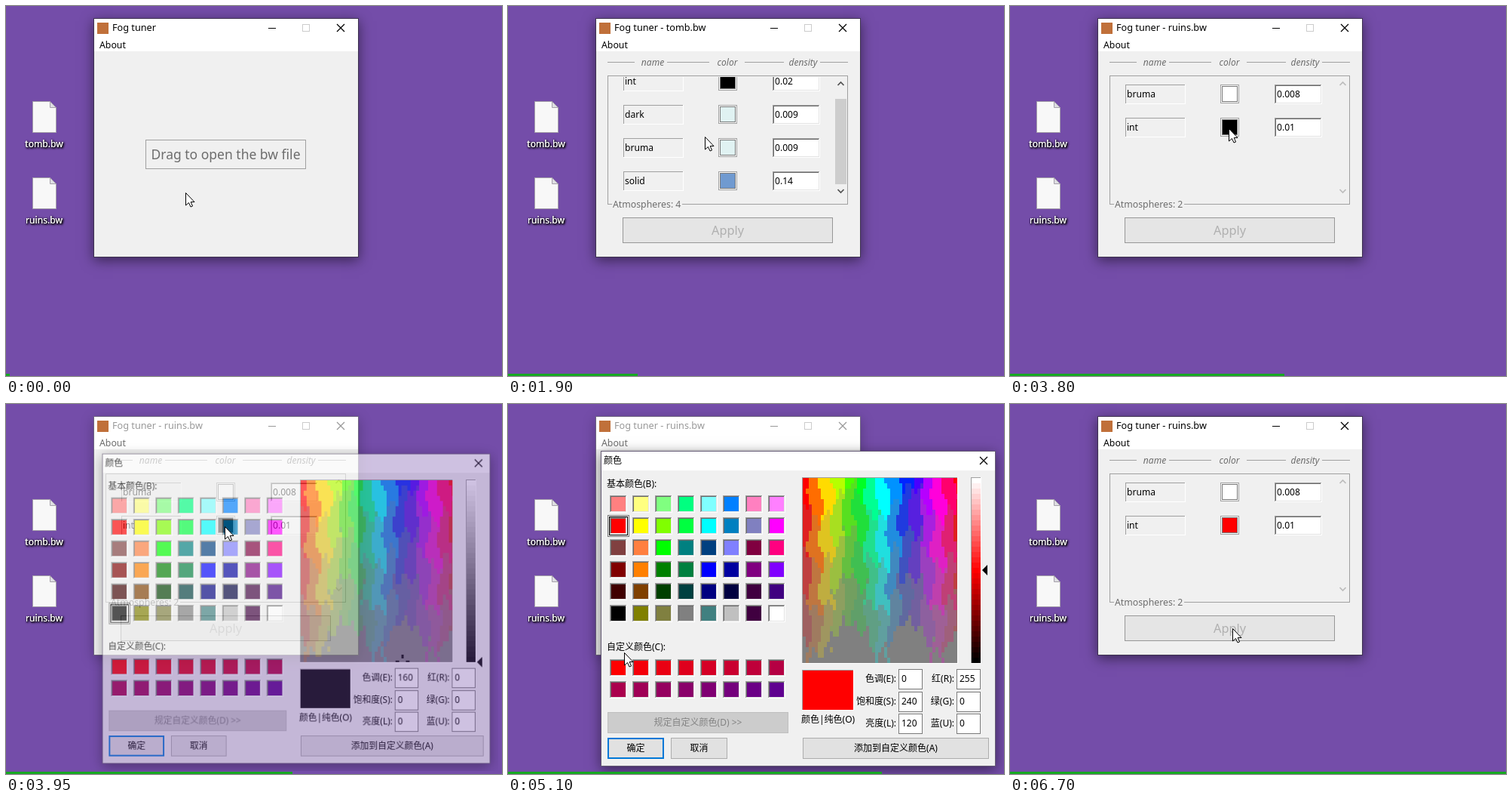
An HTML page with a canvas that plays this animation: 658x490 px, repeating every 7.1 s.

```html
<!DOCTYPE html>
<html lang="en">
<head>
<meta charset="utf-8">
<title>Fog tuner</title>
<style>
html, body { margin: 0; width: 100%; height: 100%; overflow: hidden; background: #744da9; }
canvas { display: block; }
</style>
</head>
<body>
<canvas id="stage" width="658" height="490"></canvas>
<script>
const W = 658, H = 490, LOOP = 7100, STEP = 50;
const APP = 'Fog tuner';
const FONT = '"Noto Sans", "Noto Sans CJK SC", sans-serif';
const screen = document.getElementById('stage').getContext('2d');
let g = screen;

const layer = () => {
  const c = document.createElement('canvas');
  c.width = W;
  c.height = H;
  return c.getContext('2d');
};
const clamp = v => Math.max(0, Math.min(1, v));
const within = (t, a, b) => t >= a && t < b;

function rect(x, y, w, h, fill) {
  g.fillStyle = fill;
  g.fillRect(x, y, w, h);
}

function box(x, y, w, h, fill, edge, line = 1) {
  rect(x, y, w, h, edge);
  rect(x + line, y + line, w - 2 * line, h - 2 * line, fill);
}

function sunken(x, y, w, h, fill, dark = '#a0a0a0') {
  rect(x, y, w, h, '#fff');
  rect(x, y, w - 1, h - 1, dark);
  rect(x + 1, y + 1, w - 2, h - 2, fill);
}

function deep(x, y, w, h, fill) {
  sunken(x, y, w, h, '#e3e3e3');
  rect(x + 1, y + 1, w - 3, h - 3, '#696969');
  rect(x + 2, y + 2, w - 4, h - 4, fill);
}

function text(s, x, y, size = 12, color = '#000', align = 'left', style = '') {
  g.font = `${style} ${size}px ${FONT}`;
  g.textAlign = align;
  g.fillStyle = color;
  g.fillText(s, x, y);
}

function stroke(points, color, width = 1) {
  g.strokeStyle = color;
  g.lineWidth = width;
  g.beginPath();
  points.forEach(([x, y]) => g.lineTo(x, y));
  g.stroke();
}

function poly(points, fill, edge) {
  g.beginPath();
  points.forEach(([x, y]) => g.lineTo(x, y));
  g.closePath();
  g.fillStyle = fill;
  g.fill();
  if (edge) {
    g.strokeStyle = edge;
    g.lineWidth = 1;
    g.stroke();
  }
}

function dotted(x, y, w, h) {
  g.strokeStyle = '#000';
  g.lineWidth = 1;
  g.setLineDash([1, 1]);
  g.strokeRect(x + .5, y + .5, w - 1, h - 1);
  g.setLineDash([]);
}

function cross(x, y, color) {
  stroke([[x, y], [x + 10, y + 10]], color, 1.2);
  stroke([[x + 10, y], [x, y + 10]], color, 1.2);
}

function shadow(x, y, w, h, alpha) {
  g.save();
  g.shadowColor = `rgba(0,0,0,${alpha})`;
  g.shadowBlur = 16;
  g.shadowOffsetY = 4;
  rect(x, y, w, h, '#444');
  g.restore();
}

// Pointer: resting points, eased in between
const path = [
  [300, 238, 247], [600, 50, 147], [680, 50, 147], [950, 250, 196], [1050, 250, 196],
  [1250, 261, 173], [1900, 261, 173], [2450, 50, 248], [2600, 50, 248], [2900, 251, 197],
  [3100, 251, 197], [3600, 290, 162], [4200, 290, 162], [4600, 146, 161], [4800, 146, 161],
  [5350, 160, 456], [5600, 160, 456], [6200, 295, 297], [7100, 295, 297]
];
const presses = [[650, 1000], [2550, 3000], [3700, 3800], [4650, 4800], [5400, 5500], [6350, 6450]];

function pointer(t) {
  const i = path.findIndex(p => p[0] > t);
  if (i < 1) return path[0].slice(1);
  const [t0, x0, y0] = path[i - 1], [t1, x1, y1] = path[i];
  const u = (t - t0) / (t1 - t0), e = u * u * (3 - 2 * u);
  return [x0 + (x1 - x0) * e, y0 + (y1 - y0) * e].map(Math.round);
}

function drawPointer(t, [x, y], held) {
  if (held) {
    g.fillStyle = 'rgba(246,243,84,.8)';
    g.beginPath();
    g.arc(x, y, 12, 0, 7);
    g.fill();
  }
  const arrow = [[0, 0], [0, 16.5], [4, 13], [6.5, 18.5], [9, 17.5], [6.7, 12], [11.5, 12]];
  poly(arrow.map(([a, b]) => [x + a + .5, y + b + .5]), '#fff', '#000');
  if (held && t < 3100 && x > 117) {
    dotted(x + 3, y + 15, 12, 8);
    box(x + 10, y + 20, 11, 11, '#fff', '#000');
    rect(x + 13, y + 25, 5, 1, '#000');
    rect(x + 15, y + 23, 1, 5, '#000');
  }
}

function file(name, y, [px, py], held) {
  if (within(px, 13, 89) && within(py, y - 5, y + 71)) {
    box(13, y - 5, 76, 76, '#8a69b6', '#a78dc9');
    if (held) rect(14, y - 4, 74, 74, 'rgba(255,255,255,.15)');
  }
  poly([[35.5, y + .5], [58.5, y + .5], [66.5, y + 8.5], [66.5, y + 41.5], [35.5, y + 41.5]], '#f8f8f8', '#a5a0aa');
  poly([[58.5, y + .5], [58.5, y + 8.5], [66.5, y + 8.5]], '#dedee2', '#a5a0aa');
  g.save();
  g.shadowColor = '#000';
  g.shadowBlur = 3;
  g.shadowOffsetX = g.shadowOffsetY = 1;
  for (let i = 0; i < 3; i++) text(name, 50.5, y + 61, 12.1, '#fff', 'center');
  g.restore();
}

// Main window
const tomb = [['int', '#000', '0.02'], ['dark', '#e0f2f2', '0.009'], ['bruma', '#e0f2f2', '0.009'], ['solid', '#709ad0', '0.14']];
const ruins = red => [['bruma', '#fff', '0.008'], ['int', red ? '#f00' : '#000', '0.01']];

function row([name, color, density], y) {
  sunken(153, y, 80, 26, '#f0f0f0');
  text(name, 155, y + 17, 12.1);
  box(279, y, 25, 25, '#fff', '#a0a0a0');
  box(281, y + 2, 21, 21, color, '#777');
  deep(351, y, 63, 26, '#fff');
  text(density, 354, y + 17, 12.1);
}

function chevron(y, dir, color) {
  stroke([[437.5, y + 2 * dir], [441.5, y - 2 * dir], [445.5, y + 2 * dir]], color, 1.7);
}

function panel(rows, scroll, canApply) {
  const gray = '#6d6d6d', line = '#a0a0a0';
  [[132, 168], [211, 267], [314, 366], [414, 451]].forEach(([a, b]) => rect(a, 74, b - a, 1, line));
  text('name', 192, 79, 12, gray, 'center', 'italic');
  text('color', 291, 79, 12, gray, 'center', 'italic');
  text('density', 391.5, 79, 12, gray, 'center', 'italic');

  box(132, 92, 319, 171, '#f0f0f0', line);
  rect(138, 262, 93, 1, '#f0f0f0');
  text('Atmospheres: ' + rows.length, 139, 267, 12.3, gray);

  g.save();
  g.beginPath();
  g.rect(133, 94, 317, 159);
  g.clip();
  rows.forEach((r, i) => row(r, 104 + 44 * i - scroll));
  g.restore();

  const full = rows.length > 3, ink = full ? '#505050' : '#bcbcbc';
  if (full) rect(434, 111 + Math.round(scroll * 12 / 17), 15, 113, '#cdcdcd');
  chevron(103, 1, ink);
  chevron(245, -1, ink);

  box(152, 280, 279, 34, '#e5e5e5', '#979797');
  text('Apply', 291.5, 303, 16.3, canApply ? '#000' : '#b0b0b0', 'center');
}

function mainWindow(t) {
  const idle = within(t, 650, 950) || within(t, 2550, 2900) || within(t, 3850, 5550);
  const name = t < 1050 ? '' : t < 3050 ? ' - tomb.bw' : ' - ruins.bw';
  const ink = idle ? '#999' : '#000';
  shadow(116, 16, 352, 317, idle ? .25 : .5);
  box(116, 16, 352, 317, '#f0f0f0', idle ? '#6f6580' : '#3f3350');
  rect(117, 17, 350, 43, '#fff');
  rect(121, 22, 15, 15, '#c0703a');
  text(APP + name, 141, 33, 12.7, ink);
  rect(348, 29, 10, 1, ink);
  box(393, 24, 10, 10, '#fff', '#ccc');
  cross(439, 24, ink);
  text('About', 124, 56, 12.3, idle ? '#6d6d6d' : '#000');
  if (t < 1050) {
    box(185, 177, 213, 39, '#f0f0f0', '#a0a0a0');
    text('Drag to open the bw file', 291.5, 203, 17.5, '#6d6d6d', 'center');
  } else if (t < 3050) {
    panel(tomb, Math.round(17 * clamp((t - 1350) / 150)), false);
  } else {
    panel(ruins(t >= 5550), 0, within(t, 5550, 6450));
  }
}

// Colour dialog
const basic = ('f88 ff8 8f8 0f8 8ff 08f f8c f8f f00 ff0 8f0 0f4 0ff 08c 88c f0f ' +
  '844 f84 0f0 088 048 88f 804 f08 800 f80 080 084 00f 00a 808 80f ' +
  '400 840 040 044 008 004 404 408 000 880 884 888 488 ccc 404 fff').split(' ')
  .map(c => '#' + [...c].map(d => d === 'f' ? 'ff' : d + '0').join(''));
const custom = Array.from({ length: 16 }, (_, i) => `rgb(${255 - 10.6 * i},0,${9.6 * i})`);

// Hue across, saturation down, in a few flat tones with ragged borders
const spectrum = layer();
g = spectrum;
for (let i = 0; i < 52; i++) {
  for (let j = 0; j < 35; j++) {
    const hue = Math.round(i / 52 * 14 + .25 * Math.sin(j * .6 + i * .3)) * 360 / 14;
    const jag = .1 * Math.sin(hue * 2) + .04 * Math.sin(i * 1.4);
    const sat = clamp(Math.round((1 - j / 34 + jag) * 4) / 4);
    rect(i * 4, j * 7, 4, 7, `hsl(${hue},${sat * 100}%,50%)`);
  }
}

function swatches(colors, y, chosen) {
  colors.forEach((c, i) => {
    const x = 135 + i % 8 * 30, sy = y + 29 * (i >> 3);
    if (i === chosen) {
      dotted(x - 3, sy - 3, 29, 29);
      box(x - 1, sy - 1, 25, 25, c, '#000');
    }
    deep(x, sy, 23, 23, c);
  });
}

function button(label, x, y, w, fill, edge, line, color) {
  box(x, y, w, 28, fill, edge, line);
  text(label, x + w / 2, y + 18, 12, color, 'center');
}

function field(label, value, x, y) {
  text(label, x - 3, y + 17, 12, '#000', 'right');
  box(x, y, 32, 27, '#fff', '#7a7a7a');
  text(value, x + 4, y + 17);
}

function dialog(t, [px, py], held) {
  const red = t >= 4650, ink = t < 5550 ? '#000' : '#999';
  shadow(123, 62, 524, 418, .5);
  box(123, 62, 524, 418, '#f0f0f0', '#655b74');
  rect(124, 63, 522, 25, '#fff');
  text('颜色', 127, 79, 12, ink);
  cross(626, 70, ink);

  text('基本颜色(B):', 131, 110);
  swatches(basic, 121, red ? 8 : 40);
  text('自定义颜色(C):', 131, 326);
  swatches(custom, 338, -1);

  const hover = py > 442 && px < 207;
  button('规定自定义颜色(D) >>', 132, 408, 240, '#ccc', '#bfbfbf', 1, '#838383');
  button('确定', 132, 442, 75, hover ? held ? '#cce4f7' : '#e5f1fb' : '#e1e1e1', '#0078d7', hover ? 1 : 2);
  button('取消', 216, 442, 75, '#e1e1e1', '#adadad', 1);
  button('添加到自定义颜色(A)', 391, 442, 247, '#e1e1e1', '#adadad', 1);

  sunken(390, 97, 207, 247, '#808080');
  g.drawImage(spectrum.canvas, 0, 0, 205, 245, 391, 98, 205, 245);
  if (!red) {
    rect(527, 333, 3, 5, '#000');
    rect(519, 341, 5, 2, '#000');
    rect(533, 341, 5, 2, '#000');
  }
  sunken(614, 97, 14, 247, '#000');
  for (let j = 0; j < 35; j++) {
    rect(615, 98 + j * 7, 12, 7, `hsl(0,${red ? 100 : 0}%,${100 - j / 34 * 100}%)`);
  }
  const ay = red ? 220 : 343;
  poly([[629, ay], [636, ay - 7], [636, ay + 7]], '#000');

  sunken(390, 352, 69, 54, red ? '#f00' : '#000');
  text('颜色|纯色(O)', 389, 422);
  const values = red ? [0, 240, 120, 255, 0, 0] : [160, 0, 0, 0, 0, 0];
  ['色调(E):', '饱和度(S):', '亮度(L):', '红(R):', '绿(G):', '蓝(U):'].forEach((label, i) =>
    field(label, values[i], i < 3 ? 518 : 595, 351 + Math.round(i % 3 * 29.5)));
}

const sheet = layer();

function showDialog(t, at, held) {
  const p = Math.min(clamp((t - 3857) / 143), clamp((5633 - t) / 110));
  if (!p) return;
  g = sheet;
  g.clearRect(0, 0, W, H);
  dialog(t, at, held);
  g = screen;
  const s = 1 - .049 * (1 - p);
  g.save();
  g.globalAlpha = p;
  g.translate(384.5, 270.5);
  g.scale(s, s);
  g.drawImage(sheet.canvas, -384.5, -270.5);
  g.restore();
}

function draw(t) {
  const at = pointer(t), held = presses.some(([a, b]) => within(t, a, b));
  g = screen;
  rect(0, 0, W, H, '#744da9');
  file('tomb.bw', 126, at, held);
  file('ruins.bw', 227, at, held);
  mainWindow(t);
  showDialog(t, at, held);
  drawPointer(t, at, held);
  const done = Math.min(130, Math.max(1, t / STEP - 4));
  rect(0, 487, Math.round(W * done / 130), 3, '#16a822');
}

const start = performance.now();
function tick() {
  const t = (performance.now() - start) % LOOP;
  draw(Math.floor(t / STEP) * STEP);
  requestAnimationFrame(tick);
}
tick();
</script>
</body>
</html>
```
